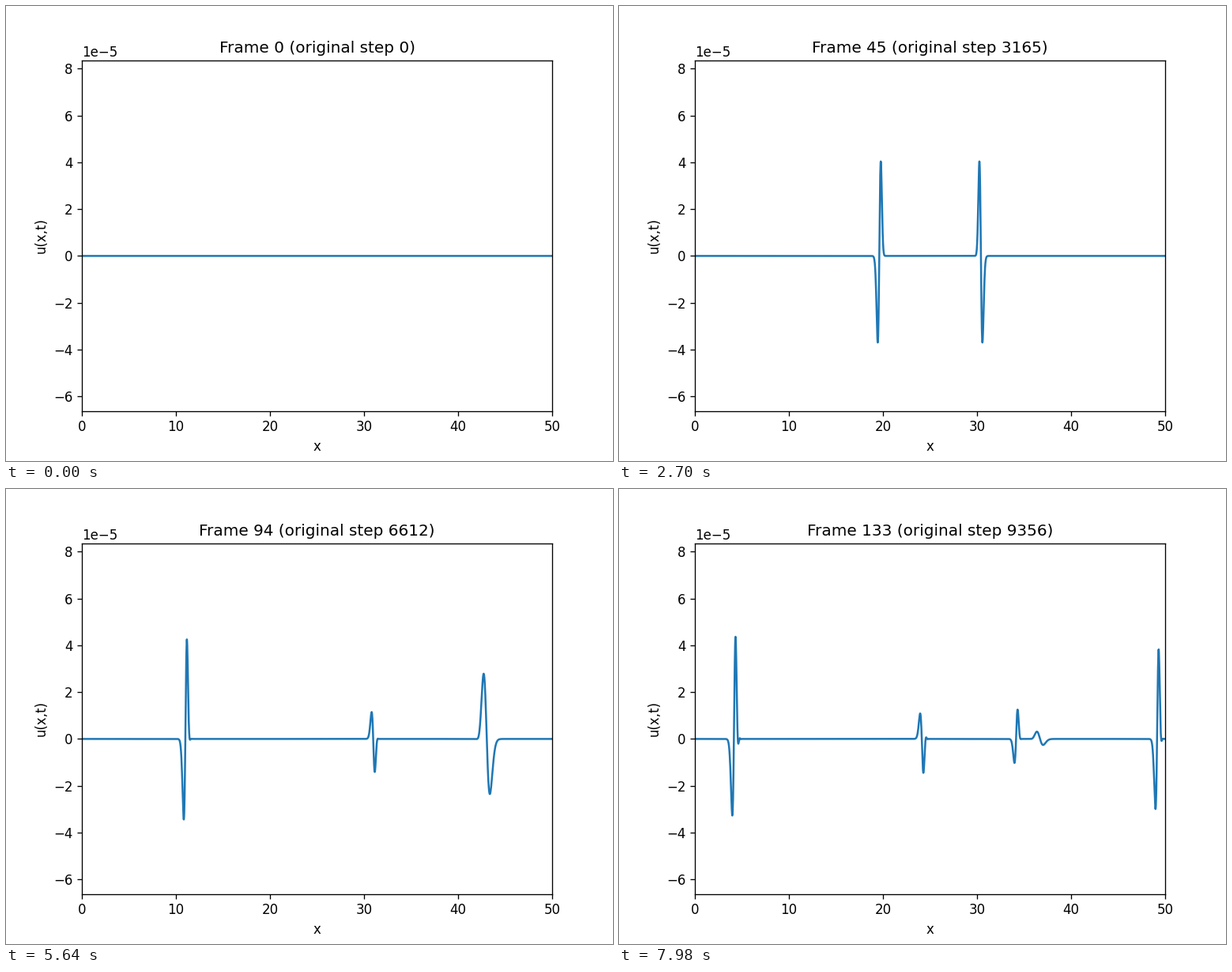
Write a matplotlib script that moves like this. It is 768 px wide and 576 px high and loops after 8 s.

```python
import numpy as np
import matplotlib.pyplot as plt
from matplotlib.animation import FuncAnimation

# Grid and time step
LENGTH, NX = 50.0, 2501
DX = LENGTH / (NX - 1)
DT = 0.0025

# Playback: each picture is held for 3 ticks of 20 ms
TICK, HOLD, TICKS = 20, 3, 400
PICTURES = (TICKS + HOLD - 1) // HOLD
STRIDE = 70.348

# Point source: Ricker pulse in time
SIGMA, DELAY = 0.16, 2.5
AMPLITUDE = 3.86e-5

x = np.linspace(0, LENGTH, NX)
steps = [int(k * STRIDE) for k in range(PICTURES)]


def ricker(t):
    s = ((t - DELAY) / SIGMA) ** 2
    return (1 - s) * np.exp(-s / 2)


def simulate():
    """Leapfrog for u_tt = (c^2 u_x)_x with a fast slab and mirror ends."""
    speed = np.where((x >= 35) & (x <= 45), 2.0, 1.0)
    c2 = speed ** 2
    flux_coef = 0.5 * (c2[1:] + c2[:-1]) * (DT / DX) ** 2
    # Strength that makes each outgoing pulse reach AMPLITUDE
    strength = 2 * AMPLITUDE * np.exp(0.5) / (SIGMA * DX)
    force = strength * DT ** 2 * ricker(np.arange(steps[-1] + 1) * DT)
    mid = NX // 2

    old, now = np.zeros(NX), np.zeros(NX)
    wanted, shots = set(steps), []
    for n in range(steps[-1] + 1):
        if n in wanted:
            shots.append(now.copy())
        flux = flux_coef * np.diff(now)
        new = 2 * now - old
        new[1:-1] += flux[1:] - flux[:-1]
        new[0] += 2 * flux[0]
        new[-1] -= 2 * flux[-1]
        new[mid] += force[n]
        old, now = now, new
    return shots


waves = simulate()

fig, ax = plt.subplots(figsize=(6.4, 4.8), dpi=120)
line, = ax.plot(x, waves[0], color="#1f77b4", lw=1.5)
ax.set_xlim(0, LENGTH)
ax.set_ylim(-6.621e-5, 8.343e-5)
ax.set_xlabel("x")
ax.set_ylabel("u(x,t)")
title = ax.set_title("")


def update(tick):
    k = tick // HOLD
    line.set_ydata(waves[k])
    title.set_text(f"Frame {k} (original step {steps[k]})")
    return line, title


def reset():
    return update(0)


anim = FuncAnimation(fig, update, frames=TICKS, init_func=reset,
                     interval=TICK, repeat=True, repeat_delay=0, blit=False)
plt.show()
```
